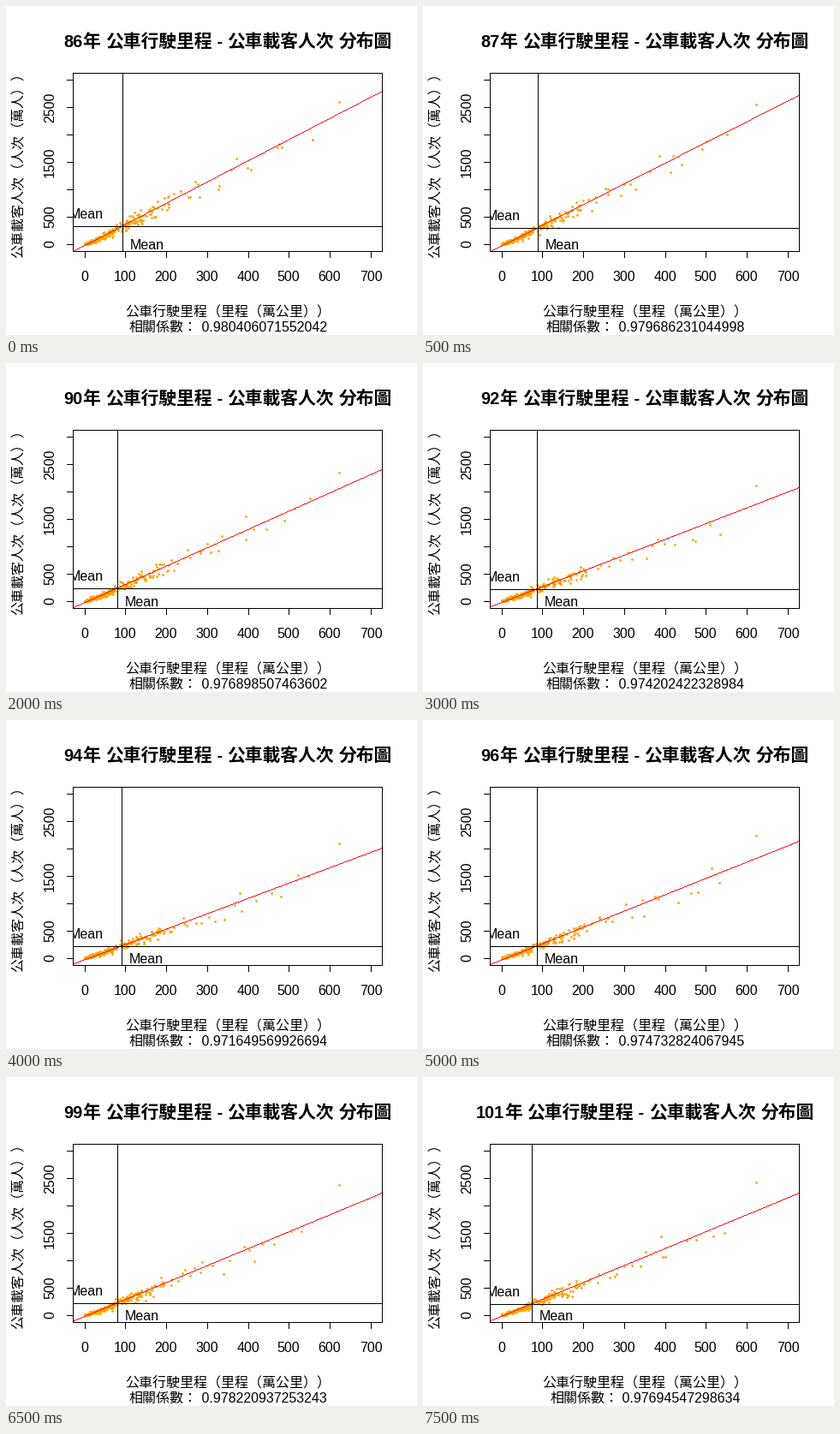
These frames come from a looping animation (480x384 px, 8 s). A matplotlib script:

```python
from itertools import groupby

import matplotlib.pyplot as plt
import numpy as np
from matplotlib.animation import FuncAnimation
from matplotlib.transforms import Bbox, TransformedBbox

W, H, DPI = 480, 384, 96
PT = 72 / DPI
LEFT, RIGHT, TOP, BOTTOM = 78, 439, 78, 286
X0, Y0 = 92, 278            # position of the data origin
SX, SY = 0.4775, 0.064      # pixels per data unit
MID_X, MID_Y = 259.2, 182
YEARS = range(86, 102)

# Key years: mean lines, right end of the fit (pixels), correlation
KEYS = [86, 89, 92, 94, 97, 99, 101]
MEAN_X = [136, 128, 133, 135, 132, 130, 127]
MEAN_Y = [257, 263, 264, 264, 264, 264, 265]
FIT_END = [100, 114, 146, 150, 138, 136, 136]
CORR = [0.980406071552042, 0.978246550030911, 0.974202422328984,
        0.971649569926694, 0.97627445113857, 0.978220937253243,
        0.97694547298634]

ADVANCE = {" ": 0.278, ".": 0.278, "-": 0.333}

fig = plt.figure(figsize=(W / DPI, H / DPI), dpi=DPI, facecolor="white")
ax = fig.add_axes([0, 0, 1, 1])
plot_area = TransformedBbox(
    Bbox([[LEFT, TOP], [RIGHT, BOTTOM]]), ax.transData)


def is_cjk(ch):
    return ord(ch) > 0x2E80


def write(x, y, s, size=16, font="Liberation Sans", **kw):
    return ax.text(x, y, s, fontsize=size * PT, family=font, va="baseline",
                   rotation_mode="anchor", **kw)


def mixed(s, mid, base, size=16, cjk=16, upright=True, weight="normal"):
    """Centre a line of Latin and CJK runs on mid."""
    runs = []
    for wide, chars in groupby(s, is_cjk):
        part = "".join(chars)
        width = (len(part) * cjk if wide
                 else size * sum(ADVANCE.get(c, 0.556) for c in part))
        runs.append((part, wide, width))
    pos = -sum(r[2] for r in runs) / 2
    for part, wide, width in runs:
        x, y = (mid + pos, base) if upright else (base, mid - pos)
        write(x, y, part, cjk if wide else size,
              "Noto Sans CJK JP" if wide else "Liberation Sans",
              rotation=0 if upright else 90, weight=weight)
        pos += width


def line(xs, ys):
    ax.plot(xs, ys, color="black", lw=PT, antialiased=False,
            solid_capstyle="butt")


def routes(i, fit):
    """Stage positions of all routes in one year."""
    rng = np.random.default_rng(7)
    core = -36 * np.log(1 - rng.random(225) * (1 - np.exp(-95 / 36)))
    tail = 90 + 165 * np.linspace(0, 1, 24) ** 2
    dx = np.append(core, tail)
    z = rng.normal(size=dx.size)
    drift = np.random.default_rng(YEARS[i]).normal(size=dx.size)

    dx = np.abs(dx * (1 + 0.03 * drift))
    line_h = Y0 - fit(X0 + dx)
    h = np.maximum(line_h, 0.33 * dx)
    noise = 0.75 * z + 0.6 * drift[::-1]
    h = np.maximum(h + noise * np.minimum(0.13 * h + 0.7, 9), 0)

    # One very busy route drifts further above the fit
    top = X0 + 297
    return (np.append(X0 + dx, top),
            np.append(Y0 - h, fit(top) - 14 - 1.3 * i))


def draw_axes():
    line([LEFT, RIGHT, RIGHT, LEFT, LEFT], [TOP, TOP, BOTTOM, BOTTOM, TOP])
    for v in range(0, 701, 100):
        x = np.floor(X0 + v * SX)
        line([x, x], [BOTTOM, BOTTOM + 7])
        write(x, 321, str(v), ha="center")
    for v in range(0, 3001, 500):
        y = np.floor(Y0 - v * SY)
        line([LEFT - 7, LEFT], [y, y])
        if v in (0, 500, 1500, 2500):
            write(56, y, str(v), ha="center", rotation=90)
    mixed("公車行駛里程（里程（萬公里））", MID_X, 362)
    mixed("公車載客人次（人次（萬人））", MID_Y, 20, upright=False)


def draw(i):
    year = YEARS[i]
    ax.clear()
    ax.set(xlim=(0, W), ylim=(H, 0))
    ax.axis("off")

    mx = np.ceil(np.interp(year, KEYS, MEAN_X))
    my = np.floor(np.interp(year, KEYS, MEAN_Y))
    slope = (my - np.interp(year, KEYS, FIT_END)) / (RIGHT - mx)

    def fit(x):
        return my - slope * (x - mx)

    px, py = routes(i, fit)
    ax.scatter(np.round(px), np.round(py), s=(2.8 * PT) ** 2, c="#ffa500",
               linewidths=0, antialiased=False, zorder=1)

    # Pixel markers keep the sloped line one pixel thick
    xs = np.arange(LEFT, RIGHT + 1)
    ys = np.round(fit(xs))
    inside = ys <= BOTTOM
    ax.plot(xs[inside], ys[inside], ",", color="red")
    line([mx, mx], [TOP, BOTTOM])
    line([LEFT, RIGHT], [my, my])
    write(mx + 8.5, 284.5, "Mean")
    write(73.5, my - 9, "Mean", clip_on=True).set_clip_box(plot_area)

    draw_axes()
    mixed(f"{year}年 公車行駛里程 - 公車載客人次 分布圖", MID_X, 48,
          size=20, cjk=20.8, weight="bold")
    mixed(f"相關係數： {np.interp(year, KEYS, CORR):.15g}", MID_X, 380)
    return []


anim = FuncAnimation(fig, draw, frames=len(YEARS), interval=500,
                     init_func=lambda: [], repeat=True, repeat_delay=0)
plt.show()
```
